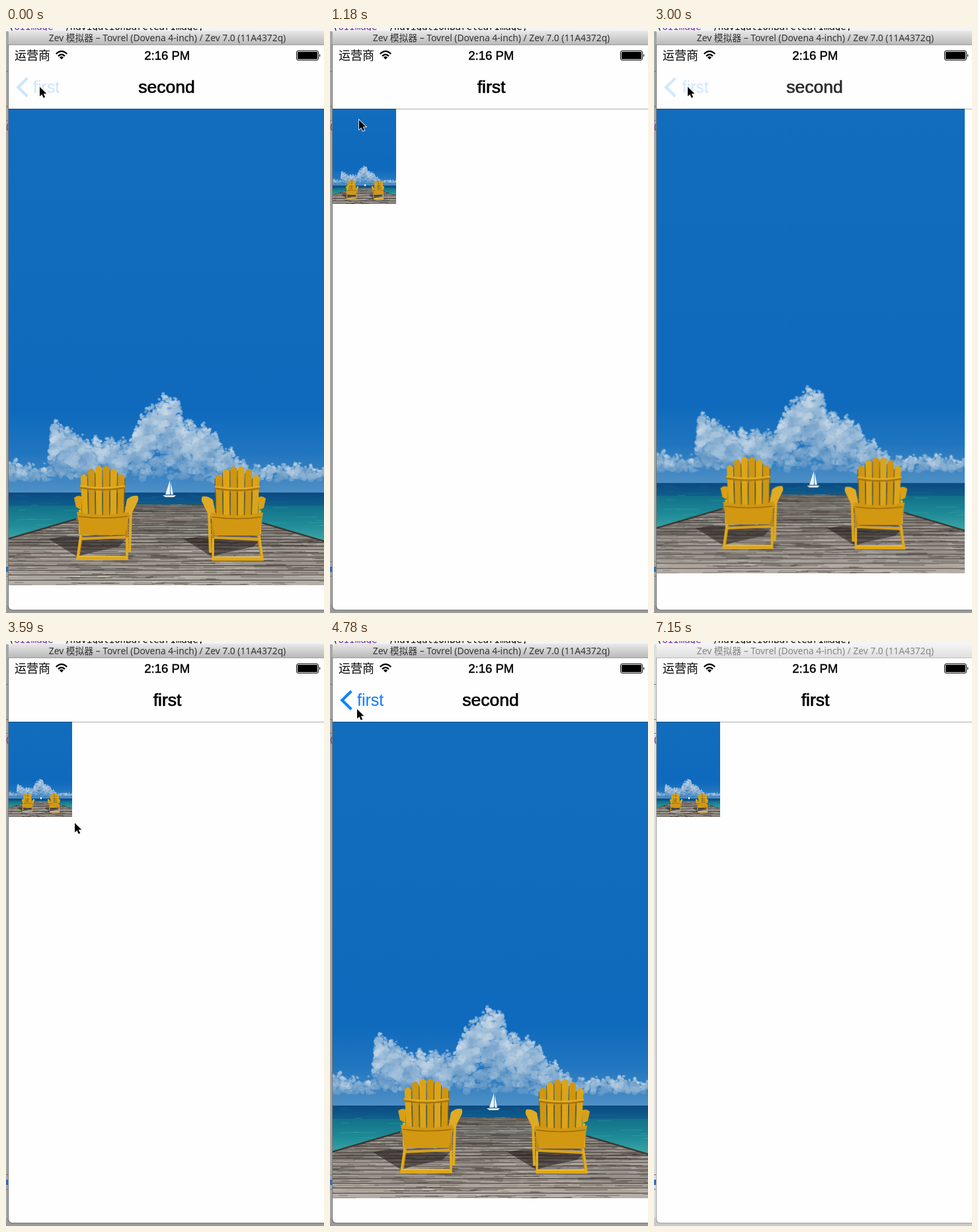
An HTML page with a canvas for the animation above (7.34 s loop, 481x884 px).

```html
<!DOCTYPE html>
<html lang="en">
<head>
<meta charset="utf-8">
<title>Zoom transition</title>
<style>
  html, body { margin: 0; width: 100%; height: 100%; overflow: hidden; background: #fff; }
  #stage { position: relative; width: 481px; height: 884px; overflow: hidden; background: #fefefe; }
  #photo { position: absolute; left: 4px; top: 122px; }
  svg { position: absolute; left: 0; top: 0; }
  text { font-family: "Liberation Sans", Arial, sans-serif; }
  .medium { stroke: #000; stroke-width: .7px; font-size: 26.5px; text-anchor: middle; }
  .status { stroke: #000; stroke-width: .5px; font-size: 18.5px; text-anchor: middle; }
  .code { font: 14px "DejaVu Sans Mono", monospace; }
  .carrier { font: 18px "Noto Sans CJK SC", "Noto Sans CJK", sans-serif; }
  .caption { font: 13.8px "Noto Sans", "Noto Sans CJK SC", sans-serif; text-anchor: middle; fill: #333; }
  .side { fill: #a6a6a6; }
  .under { fill: #9a9a9a; }
  .bar { fill: url(#barOn); }
  .edge { fill: #757575; }
  .idle .caption { fill: #858585; }
  .idle .side { fill: #dedede; }
  .idle .under { fill: #c9c9c9; }
  .idle .bar { fill: url(#barOff); }
  .idle .edge { fill: #a2a2a2; }
</style>
</head>
<body>
<div id="stage">
  <canvas id="photo" width="478" height="720"></canvas>
  <svg id="ui" width="481" height="884" viewBox="0 0 481 884">
    <defs>
      <linearGradient id="barOn" x2="0" y2="1">
        <stop stop-color="#e9e9e9"/><stop offset="1" stop-color="#b9b9b9"/>
      </linearGradient>
      <linearGradient id="barOff" x2="0" y2="1">
        <stop stop-color="#f5f5f5"/><stop offset="1" stop-color="#dfdfdf"/>
      </linearGradient>
    </defs>

    <!-- desktop behind the window -->
    <rect class="side" width="4" height="884"/>
    <rect width="481" height="5" fill="#f4f4f4"/>
    <text class="code" x="4" y="3">(<tspan fill="#6a2cae">UIImage</tspan> *)navigationBarClearImage;</text>
    <path d="M0 65.5H4M0 118.5H4M0 139.5H4M0 806.5H4M0 828.5H4" stroke="#777"/>
    <path d="M3 145Q0 150 3 155" fill="none" stroke="#9a2aa8" stroke-width="1.5"/>
    <rect y="814" width="3" height="8" fill="#2b70bd"/>
    <path class="under" d="M0 884V872H4Q4 879 9 879H481V884Z"/>
    <path class="edge" d="M3 25H4V873Q4 879 10 879H481V880H9Q3 880 3 873Z"/>

    <!-- window and status bar -->
    <path class="bar" d="M4 25V9Q4 4 9 4H481V25Z"/>
    <rect class="edge" x="4" y="25" width="477" height="1" opacity=".7"/>
    <text class="caption" x="244" y="20">Zev 模拟器 – Tovrel (Dovena 4-inch) / Zev 7.0 (11A4372q)</text>
    <rect x="4" y="26" width="477" height="96" fill="#fefefe"/>
    <rect x="4" y="122" width="477" height="1" fill-opacity=".32"/>
    <text class="carrier" x="13" y="48">运营商</text>
    <path d="M75.8 39.2Q84 31 92.2 39.2M79 42.5Q84 37.4 89 42.5" fill="none" stroke="#000" stroke-width="2.4"/>
    <path d="M80.8 44.2Q84 41.6 87.2 44.2L84 47.6Z"/>
    <text class="status" x="243.7" y="48">2:16 PM</text>
    <rect x="439.5" y="34.5" width="33" height="14" rx="2.5" fill="none" stroke="#000"/>
    <rect x="441" y="36" width="30" height="11" rx="1"/>
    <path d="M474 39Q476.5 41.5 474 44Z"/>

    <!-- navigation bar -->
    <g id="back">
      <path d="M32.3 75.8L18.3 89.5L32.3 103.2" fill="none" stroke="#0a84ff" stroke-width="4.2"/>
      <text id="backLabel" x="41" y="98" font-size="25" fill="#0a7cff">first</text>
    </g>
    <text id="first" class="medium" x="244" y="98">first</text>
    <text id="second" class="medium" x="243" y="98">second</text>

    <path id="cursor" d="M0 0V14.2L3.3 11.2L5.7 16.6L8.2 15.5L5.8 10.3H10.4Z"
          stroke="#fff" stroke-width="1.6" paint-order="stroke"/>
  </svg>
</div>
<script>
const LOOP = 7340, ZOOM = 350, GLIDE = 450, IDLE_AT = 7150;

// Zooms alternate: out to the thumbnail, back in to full size.
const zoomStarts = [249, 1489, 2950, 4300, 5328];

// Pointer stops: arrival time, x, y.
const stops = [
  [0, 51, 89], [1180, 42, 155], [2400, 50, 24], [2700, 51, 89], [3590, 104, 275],
  [4040, 46, 131], [4780, 41, 103], [5070, 51, 90], [5670, 322, 586], [6410, 460, 900]
];

const $ = id => document.getElementById(id);
const clamp = v => Math.min(1, Math.max(0, v));
const mix = (a, b, k) => a + (b - a) * k;
const smooth = s => s * s * (3 - 2 * s);

// The picture holds still between evenly spaced refreshes.
function holdTime(t) {
  if (t < 300) return 0;
  const [base, step] = t < 2400 ? [300, 147] : [2400, 148.4];
  return base + Math.floor((t - base) / step) * step;
}

// cubic-bezier(.42, 0, .58, 1)
function easeInOut(x) {
  let lo = 0, hi = 1;
  for (let i = 0; i < 20; i++) {
    const s = (lo + hi) / 2, u = 1 - s;
    if (1.26 * u * u * s + 1.74 * u * s * s + s ** 3 < x) lo = s; else hi = s;
  }
  return smooth(lo);
}

function pointerAt(t) {
  const i = stops.findIndex(s => s[0] > t);
  if (i < 0) return stops[stops.length - 1].slice(1);
  const [from, x0, y0] = stops[i - 1], [to, x1, y1] = stops[i];
  const k = smooth(clamp(1 - (to - t) / Math.min(GLIDE, to - from)));
  return [mix(x0, x1, k), mix(y0, y1, k)];
}

function render(time) {
  const t = holdTime(time);
  const started = zoomStarts.filter(at => at <= t).length;
  const open = started % 2 === 0;
  const p = started ? clamp((t - zoomStarts[started - 1]) / ZOOM) : 1;
  const pressed = open && zoomStarts[started] - t < 260;

  const size = open ? easeInOut(p) : 1 - easeInOut(p);
  $('photo').style.width = mix(96, 478, size) + 'px';
  $('photo').style.height = mix(144, 720, size) + 'px';

  const show = (id, alpha) => $(id).setAttribute('opacity', clamp(alpha));
  show('first', open ? 1 - p * 2 : (p - .45) / .55);
  show('second', open ? (p - .35) * 2.2 : 1 - p * 1.4);
  show('back', open ? (pressed ? .2 : (p - .7) * 4) : .2 * (1 - p));
  $('backLabel').setAttribute('x', open ? 41 : 41 + p * 12);
  $('cursor').setAttribute('transform', `translate(${pointerAt(t).map(Math.round)})`);
  $('ui').setAttribute('class', time >= IDLE_AT ? 'idle' : '');
}

function paintPhoto() {
  const c = $('photo').getContext('2d');
  let seed = 7;
  const rnd = () => (seed = seed * 16807 % 2147483647) / 2147483647;
  const rect = (color, x, y, w, h) => { c.fillStyle = color; c.fillRect(x, y, w, h); };
  const shape = (color, d) => { c.fillStyle = color; c.fill(new Path2D(d)); };
  const line = (color, width, d) => {
    c.strokeStyle = color; c.lineWidth = width; c.stroke(new Path2D(d));
  };
  const wash = (y0, y1, ...colors) => {
    const g = c.createLinearGradient(0, y0, 0, y1);
    colors.forEach((color, i) => g.addColorStop(i / (colors.length - 1), color));
    rect(g, 0, y0, 486, y1 - y0);
  };
  c.translate(-4, -122);

  // sky
  wash(122, 580, '#126dbd', '#0f6abd');
  wash(580, 703, '#0f6abd', '#2075bf', '#4f90c5');

  // clouds fill the space under a skyline and thin out towards the horizon
  const skyline = [
    [0, 652], [62, 660], [70, 593], [130, 618], [184, 620], [212, 573], [243, 552],
    [261, 562], [268, 590], [306, 600], [332, 632], [372, 660], [440, 658], [490, 666]
  ];
  const topAt = x => {
    const i = skyline.findIndex(s => s[0] > x), [x0, y0] = skyline[i - 1], [x1, y1] = skyline[i];
    return mix(y0, y1, smooth((x - x0) / (x1 - x0))) + 3 * Math.sin(x * .31) + 2 * Math.sin(x * .73);
  };
  for (let i = 0; i < 9000; i++) {
    const x = rnd() * 486, y = 550 + rnd() * 132, top = topAt(x);
    const depth = (y - top) / (684 - top);
    if (depth < 0 || depth > .5 + rnd() * .5) continue;
    const billow = Math.sin(x * .13 + 2 * Math.sin(y * .09)) * Math.sin(y * .15 + x * .04);
    const light = clamp(.72 - depth * .65 + billow * .28 + (rnd() - .5) * .35);
    const r = 1.5 + rnd() * Math.min(5, 1 + (y - top) * .15);
    c.fillStyle = `rgba(${mix(104, 218, light)},${mix(154, 228, light)},${mix(199, 236, light)},.5)`;
    c.beginPath(); c.ellipse(x, y + 2, r, r * .85, 0, 0, 7); c.fill();
  }

  // sea
  wash(702, 722, '#0b4a82', '#0f5f8c');
  wash(722, 780, '#127089', '#1f8c98', '#45abaa');
  for (let i = 0; i < 90; i++) {
    const y = 704 + rnd() * 64;
    rect(y < 720 ? 'rgba(20,104,150,.5)' : 'rgba(70,178,180,.35)', rnd() * 480, y, 8 + rnd() * 32, 1);
  }

  // sailboat
  shape('#eef3f6', 'M248 683L241 705H248ZM249 686V705H253Z');
  shape('#dce6ea', 'M237 706H257L254 709H241Z');

  // pier: boards widen towards the viewer
  c.save();
  c.clip(new Path2D('M0 772L106 741L192 720H296L388 748L486 776V842H0Z'));
  for (let y = 720; y < 842;) {
    const near = (y - 720) / 122, h = 2 + near * 6.5, v = mix(105, 148, near) + rnd() * 30;
    rect(`rgb(${v + 4},${v - 2},${v - 9})`, 0, y, 486, h);
    for (let i = 0; i < 50; i++) {
      rect(rnd() < .5 ? 'rgba(50,42,38,.4)' : 'rgba(212,205,198,.35)',
        rnd() * 520 - 40, y + rnd() * h, 10 + rnd() * 60, .6 + rnd());
    }
    rect('#433b37', 0, y + h - 1, 486, .8 + near * .8);
    y += h;
  }
  c.restore();
  line('#3c3833', 2.4, 'M0 773L106 742M388 748L486 777');

  function chair() {
    // rear legs and arms
    line('#c68b0b', 3.5, 'M183 734V792M115 764L109 803');
    line('#e2aa1a', 4, 'M189 728L187 792M112 728V764');
    shape('#e0aa24', 'M179 735L183 712Q190 706 199 707Q202 711 198 718L189 736Z');
    shape('#d99f16', 'M103 710Q108 705 114 708V728L106 724Z');
    // fanned slats
    for (let i = 0; i < 6; i++) {
      const x = 112.8 + i * 11.3, foot = 115 + i * 10.7, top = 662 + (i - 2.5) ** 2 * 2.1;
      shape(i % 2 ? '#d0960f' : '#dca417', `M${x} ${top + 3}Q${x + 5} ${top - 5} ${x + 10} ${top + 3}L${foot + 9} 738H${foot}Z`);
      line('#7d5c18', 1.1, `M${x + 10.6} ${top + 5}L${foot + 9.8} 737`);
    }
    line('#a9740c', 4, 'M112 694Q146 700 180 694');
    line('#e3ae22', 2.4, 'M112 692Q146 698 180 692');
    // seat, shadow below and foot rail
    shape('#d39811', 'M107 731Q146 740 186 731V737L180 766H113Z');
    line('#9c6d0c', 1.3, 'M110 738Q146 743 184 738');
    shape('#d9a01a', 'M114 770L181 767V771L114 774Z');
    shape('#dfa615', 'M107 798H184V804H106Z');
    line('#f0c141', 1.4, 'M107 798.5H184');
    line('#e3ad1e', 3.4, 'M113 766L108 802M183 770V804');
  }
  const shadow = 'M108 799L64 772L90 768L118 770L180 774L170 784L124 794Z';
  for (const x of [0, 204]) {
    c.translate(x, 0);
    shape('rgba(42,36,34,.6)', shadow);
    c.translate(-x, 0);
  }
  chair();
  c.save();
  c.translate(496, 1);
  c.scale(-1, 1);
  chair();
  c.restore();
}

paintPhoto();
const start = performance.now();
(function frame() {
  render((performance.now() - start) % LOOP);
  requestAnimationFrame(frame);
})();
</script>
</body>
</html>
```
